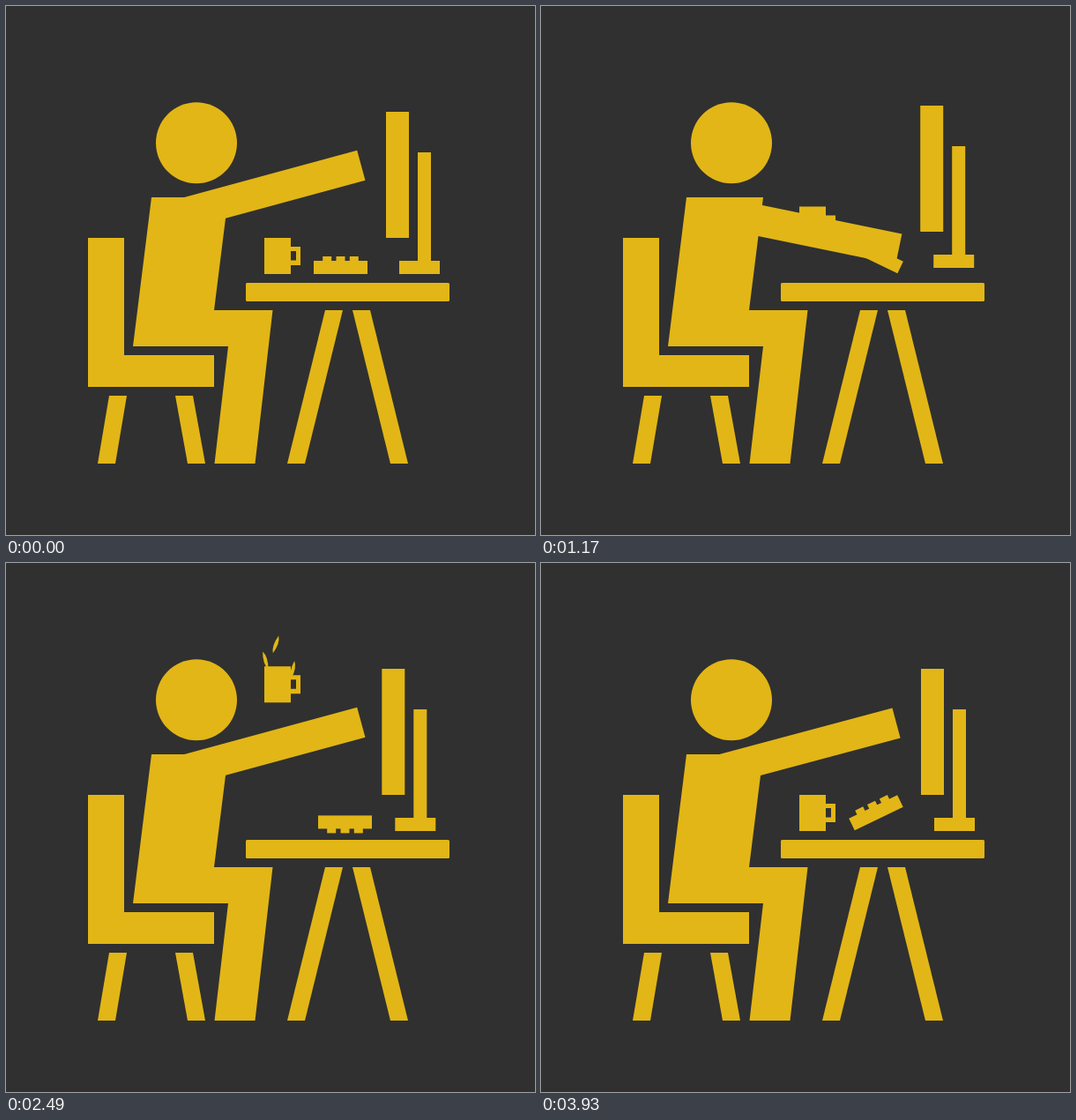
Recreate the animation shown at these times as an HTML page with a canvas. Size 600x600 px, loop 3960 ms.

```html
<!DOCTYPE html>
<html lang="en">
<head>
<meta charset="utf-8">
<title>Desk slam</title>
<style>
html, body { margin: 0; width: 100%; height: 100%; overflow: hidden; background: #303030; }
canvas { display: block; width: 600px; height: 600px; }
</style>
</head>
<body>
<canvas id="stage" width="600" height="600"></canvas>
<script>
const ctx = document.getElementById('stage').getContext('2d');
const INK = '#e2b616', PAPER = '#303030';
const LOOP = 3960, STEPS = 96;   // four cycles of 24 steps, two slams each
const CYCLE = 24, BEAT = 12, HIT = 3;

const clamp = u => Math.max(0, Math.min(1, u));
const mix = (a, b, u) => a + (b - a) * u;
const arc = u => 4 * u * (1 - u);

// cubic-bezier(.25, .1, .25, 1)
function ease(x) {
  const bez = (a, b, s) => 3 * a * s * (1 - s) ** 2 + 3 * b * s * s * (1 - s) + s ** 3;
  let lo = 0, hi = 1;
  for (let i = 0; i < 20; i++) {
    const s = (lo + hi) / 2;
    if (bez(.25, .25, s) < x) lo = s; else hi = s;
  }
  return bez(.1, 1, lo);
}

function poly(...p) {
  ctx.beginPath();
  for (let i = 0; i < p.length; i += 2) ctx.lineTo(p[i], p[i + 1]);
  ctx.closePath();
  ctx.fill();
}

const box = (x, y, w, h) => ctx.fillRect(x, y, w, h);
const leg = (top, foot, y) => poly(top, y, top + 20, y, foot + 20, 519, foot, 519);

function placed(x, y, turn, draw) {
  ctx.save();
  ctx.translate(x, y);
  ctx.rotate(turn * Math.PI / 180);
  draw();
  ctx.restore();
}

function furniture() {
  poly(93, 263, 134, 263, 134, 396, 236, 396, 236, 432, 93, 432);
  leg(117, 104, 442);
  leg(192, 206, 442);
  ctx.beginPath();
  ctx.roundRect(272, 314, 231, 21, 1.5);
  ctx.fill();
  leg(362, 319, 345);
  leg(393, 436, 345);
}

function person(n) {
  ctx.beginPath();
  ctx.arc(216, 155.3, 46, 0, 7);
  ctx.fill();
  poly(165, 217, 252, 217, 236, 345, 302.5, 345, 282.5, 519, 236.5, 519, 252, 386, 144, 386);
  const k = n % BEAT;
  const turn = k < HIT
    ? mix(-15.2, 15, (k / HIT) ** 1.15)
    : mix(15, -15.2, ease((k - HIT) / (BEAT - HIT)));
  placed(205, 234.5, turn, () => box(0, -17.7, 205, 35.4));
}

// out on the first slam, back on the second
function hops(n, span) {
  const u = clamp((n - HIT) / span), v = clamp((n - HIT - BEAT) / span);
  return { u, v, side: u - v, lift: arc(u) + arc(v) };
}

function monitor(n) {
  const { side, lift } = hops(n, 6);
  placed(-4.7 * side, -12.6 * lift, 0, () => {
    box(431, 120, 26, 143);
    box(467, 166, 15, 124);
    box(446, 289, 46, 15);
  });
}

function keyboard(n) {
  const { u, v, side, lift } = hops(n, BEAT - HIT);
  const flip = w => 180 * (w + .05 * Math.sin(2 * Math.PI * w));
  placed(379.5 + 5 * side, 296.7 - 3 * side - 33 * lift, flip(u) + flip(v), () => {
    box(-30.5, -7.7, 61, 15);
    for (let i = -1; i < 2; i++) box(i * 15.3 - 5, -12.7, 10, 6);
  });
}

function mug(n) {
  const half = n < 11.7 ? 8.85 : 9.8;
  const lift = n <= HIT ? 0 : 146 * Math.max(0, 1 - ((n - 11.7) / half) ** 2);
  placed(0, -lift, 0, () => {
    ctx.beginPath();
    ctx.rect(293, 263, 30, 41);
    ctx.rect(323, 273, 11, 21);
    ctx.rect(323, 278, 6, 10.5);
    ctx.fill('evenodd');
  });
}

function drop(n, x, y, vx, vy, tilt) {
  const d = n - 14;
  const size = Math.min(1, (n - 5) / 4, (22.8 - n) / 8.8);
  if (size <= 0) return;
  placed(x + vx * d, y + vy * d + .82 * d * d, tilt + Math.sign(tilt) * Math.max(0, d) * 2, () => {
    const h = 10.4 * size, w = 4.3 * Math.sqrt(size);
    ctx.beginPath();
    ctx.moveTo(0, -h);
    ctx.quadraticCurveTo(w, -h * .3, 0, h);
    ctx.quadraticCurveTo(-w, h * .3, 0, -h);
    ctx.fill();
  });
}

function render(t) {
  const step = Math.floor(t / LOOP * STEPS + .3);
  const n = step % CYCLE;
  ctx.fillStyle = PAPER;
  box(0, 0, 600, 600);
  ctx.fillStyle = INK;
  placed(0, n % BEAT === HIT ? 8 : 0, 0, () => {
    furniture();
    monitor(n);
    keyboard(n);
    drop(n, 306.5, 75, .25, -7.1, 18);
    drop(n, 293.5, 101, -.4, -3.1, -18);
    drop(n, 326, 105, .35, -6.5, 10);
    mug(n);
    person(n);
  });
}

const start = performance.now();
function tick() {
  render((performance.now() - start) % LOOP);
  requestAnimationFrame(tick);
}
tick();
</script>
</body>
</html>
```
